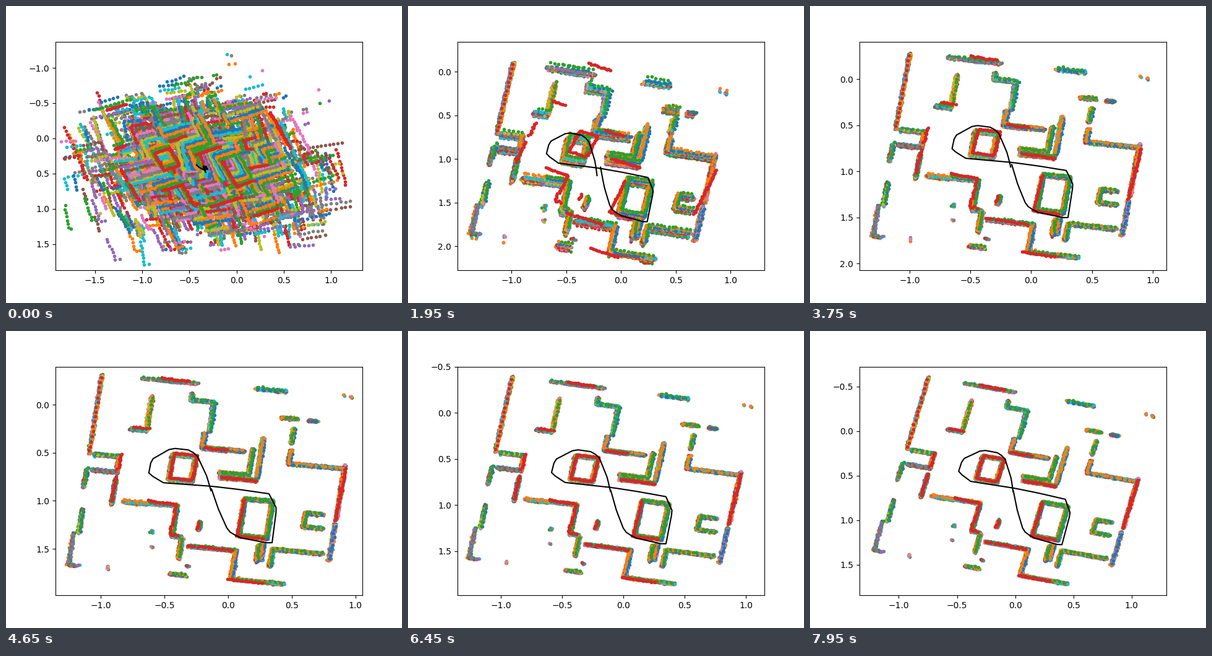
A matplotlib script for the animation above (8 s loop, 640x480 px).

```python
import numpy as np
import matplotlib.pyplot as plt
from matplotlib.animation import FuncAnimation

SCANS = 64
STEP_FRAMES = 3                      # the solver moves every 3 x 50 ms
rng = np.random.default_rng(7)

# step, map centre x and y, map angle, view left, right, top, bottom
KEYS = np.array([
    (0, -0.33, 0.43, -15.0, -1.916, 1.331, -1.373, 1.875),
    (8, -0.31, 1.57, 15.5, -1.629, 1.352, -0.001, 2.776),
    (17, -0.17, 1.00, 9.5, -1.462, 1.301, -0.429, 2.152),
    (25, -0.16, 0.91, 8.2, -1.412, 1.112, -0.405, 2.072),
    (31, -0.13, 0.855, 7.0, -1.357, 1.054, -0.399, 1.985),
    (43, -0.10, 0.816, 9.7, -1.353, 1.149, -0.501, 1.978),
    (53, -0.01, 0.646, 13.0, -1.337, 1.298, -0.725, 1.842)])
STEPS, CENTRES, VIEWS = KEYS[:, 0], KEYS[:, 1:3], KEYS[:, 4:]
ANGLES = np.radians(KEYS[:, 3])

# Floor plan: start x and y, then runs that go across, down, across, ...
SEEN_LAST = [
    (-.345, -.30, .18, .26, -.18, -.26), (.27, .09, 0, .385, .22),
    (-.76, -.23, 0, .17), (-.76, 0, 0, .27), (-.57, -1.06, .23),
    (-.71, -.525, .13), (-.125, -.395, .19), (.05, -.11, .29),
    (1.01, -.355, 0, .57), (-.48, .225, .23, .32, .07),
    (-.11, .635, .375), (.27, .935, .29), (-.05, .375, 0, .08)]
SEEN_EARLIER = [
    (-1, -1.06, 0, .83), (-.96, -.23, .20), (-.96, -.065, .20),
    (-1, -.075, 0, .20), (-.69, -1.06, .45), (-.58, -.89, 0, .37),
    (-.27, -.95, 0, .07, .18, .31), (-.125, -.55, 0, .15, .33),
    (.27, -.43, 0, .25), (.34, -.555, 0, .41), (.04, -.155, .23),
    (.22, -1.06, .24), (.455, -.785, .13), (.67, -.78, .07),
    (.565, -.685, 0, .16), (.57, -.455, 0, .14, .43), (1.005, .27, 0, .38),
    (.90, .18, -.135, .145, .15), (.553, .765, 0, -.18, .39),
    (.475, .535, 0, .17), (.44, .555, 0, .17), (.27, .09, .22, .385),
    (-.67, .235, .19), (-.17, .555, 0, .22), (.268, .635, 0, .30),
    (.56, .935, .12), (-.98, .35, 0, .25), (-1.02, .6, 0, .34, .08),
    (-.22, .94, .13), (-.41, .515), (-.71, .934), (-.39, .674),
    (-.09, .84), (.914, -1.07), (.97, -1.065)]

# One round about each of the two boxes
TRACK = [(0, .03), (-.05, -.11), (-.156, -.32), (-.22, -.363), (-.362, -.365),
         (-.505, -.225), (-.508, -.075), (-.381, .003), (0, -.007), (.218, 0),
         (.456, .016), (.533, .162), (.542, .531), (.278, .499), (.184, .442),
         (.081, .231), (0, .03)]


def corners(x, y, *runs):
    points = [(x, y)]
    for n, run in enumerate(runs):
        x, y = (x, y + run) if n % 2 else (x + run, y)
        points.append((x, y))
    return np.array(points)


def path_length(line):
    return np.r_[0, np.cumsum(np.hypot(*np.diff(line, axis=0).T))]


def along(line, s):
    """Points at the fractions s of a polyline's length."""
    line = np.asarray(line, float)
    length = path_length(line)
    return np.column_stack([np.interp(s * length[-1], length, axis)
                            for axis in line.T])


def turn(points, angle):
    c, s = np.cos(angle), np.sin(angle)
    return points @ np.array([(c, s), (-s, c)])


def observe(pose, final):
    """Wall points seen from a pose; far walls are sparser and rarer."""
    seen = []
    for wall in SEEN_LAST + ([] if final else SEEN_EARLIER):
        line = corners(*wall)
        dist = np.hypot(*(line.mean(axis=0) - pose))
        chance = 0.08 if len(line) == 1 else 1.15 - 0.7 * dist
        if not final and rng.random() > chance:
            continue
        gap = 0.016 if final else 0.014 + 0.028 * dist
        count = int(path_length(line)[-1] / gap) + 1
        seen.append(along(line, (np.arange(count) + rng.random()) / count))
    points = np.vstack(seen)
    return points + rng.normal(0, 0.004, points.shape)


s = np.linspace(0, 1, SCANS)
poses = along(TRACK, s)
drift = np.outer(s ** 8 - (1 - s) ** 8, (0.04, -0.12))
scribble = CENTRES[0] + along(rng.normal(0, (0.05, 0.04), (10, 2)), s)
start_angle = ANGLES[0] + 0.14 * np.sin(11 * s) + rng.normal(0, 0.03, SCANS)
shift = rng.normal(0, 1, (SCANS, 2))
twist = rng.normal(0, 1, SCANS)

# Leftover errors shrink from key to key
order = np.arange(1, len(KEYS))
loop_error = 1.0 / order ** 2
spread = 0.012 / order ** 0.7

tracks = np.array([scribble] + [
    CENTRES[k] + turn(poses, ANGLES[k]) + drift * loop_error[k - 1]
    for k in order])

clouds = []
for i, pose in enumerate(poses):
    final = i == SCANS - 1
    offsets = observe(pose, final) - pose
    keys = [tracks[0, i] + turn(offsets, start_angle[i])]
    for k in order:
        error = 0.8 * spread[k - 1] * twist[i]
        if final:
            error = np.radians(29) * loop_error[k - 1]
        keys.append(tracks[k, i] + turn(offsets, ANGLES[k] + error)
                    + spread[k - 1] * shift[i])
    clouds.append(np.array(keys))

fig, ax = plt.subplots(figsize=(6.4, 4.8), dpi=100)
dots = [ax.plot([], [], ".")[0] for _ in clouds]
track_line, = ax.plot([], [], "k")


def update(frame):
    step = frame // STEP_FRAMES
    j = min(np.searchsorted(STEPS, step, side="right") - 1, len(STEPS) - 2)
    u = (step - STEPS[j]) / (STEPS[j + 1] - STEPS[j])
    if j < 2:
        u = 1 - (1 - u) ** 2

    def blend(keys):
        return (1 - u) * keys[j] + u * keys[j + 1]

    left, right, top, bottom = blend(VIEWS)
    ax.set_xlim(left, right)
    ax.set_ylim(bottom, top)
    for line, keys in zip(dots, clouds):
        line.set_data(*blend(keys).T)
    track_line.set_data(*blend(tracks).T)
    return [*dots, track_line]


anim = FuncAnimation(fig, update, frames=160, interval=50, repeat=True,
                     repeat_delay=0, blit=False)
plt.show()
```
